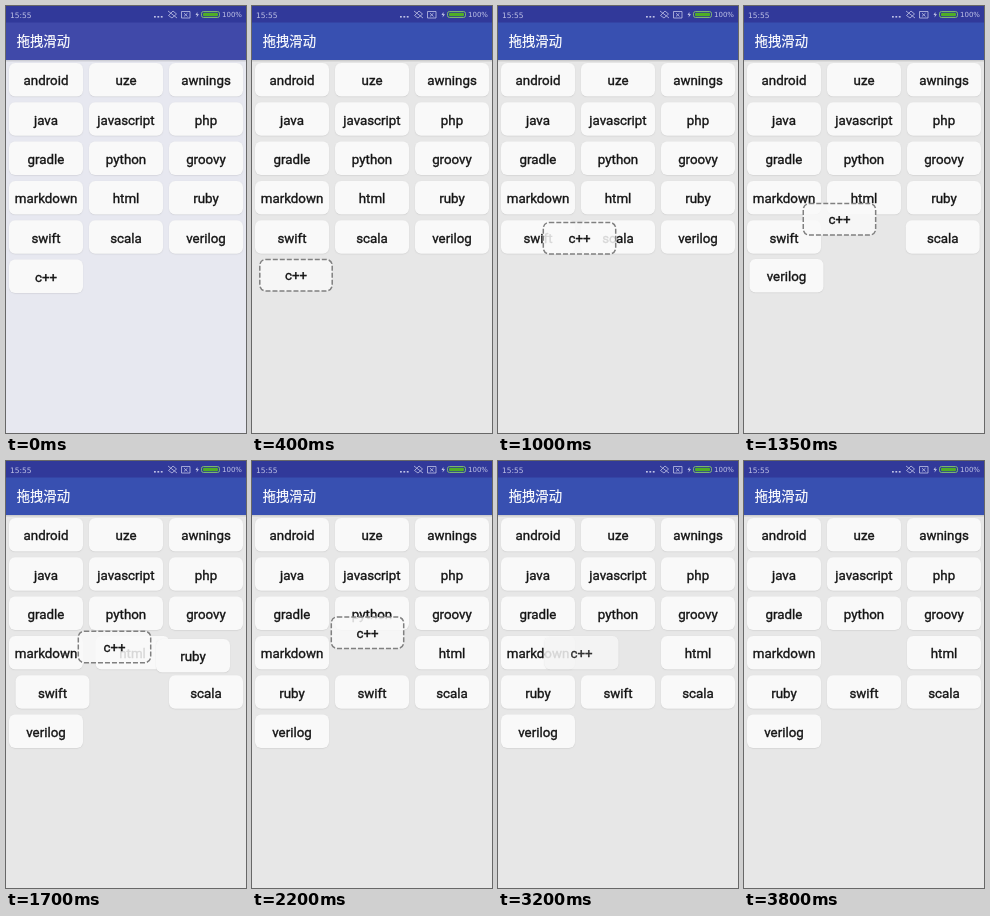
Animation, 240 px wide and 427 px high, one loop 4150 ms. Source, as an HTML page with a canvas:

```html
<!DOCTYPE html>
<html lang="zh-CN">
<head>
<meta charset="utf-8">
<title>拖拽滑动</title>
<style>
  html, body { margin: 0; height: 100%; overflow: hidden; background: #e7e7e7; }
  canvas { display: block; width: 240px; height: 427px; }
</style>
</head>
<body>
<canvas id="stage" width="240" height="427"></canvas>
<script>
const ctx = document.getElementById('stage').getContext('2d');
const LOOP = 4150, STEP = 50, LAST = 3800;
const CARD = { w: 74, h: 33.5, r: 6 };
const UI_FONT = 'Roboto, "Noto Sans CJK SC", "Noto Sans CJK", sans-serif';
const STATUS_FONT = '"DejaVu Sans", sans-serif';
const LABELS = ['android', 'uze', 'awnings', 'java', 'javascript', 'php',
  'gradle', 'python', 'groovy', 'markdown', 'html', 'ruby',
  'swift', 'scala', 'verilog'];

// Dragged card: time, x, y
const DRAG = [
  [150, 3, 253.5], [400, 7, 252.5], [550, 15, 242], [1000, 44.5, 215.5],
  [1120, 50, 214], [1650, 69.5, 174], [1700, 71.5, 169.3], [2200, 78.5, 155]
];
// Swiped card: time, x
const SWIPE = [[2850, 83], [3200, 46.5], [3300, 43], [3500, 24], [3650, -20], [3800, -90]];
const PICK_UP = 200, RELEASE = 2550, SETTLED = 2800;

const lerp = (a, b, p) => a + (b - a) * p;
const progress = (t, start, duration) => Math.min(1, Math.max(0, (t - start) / duration));
const ease = p => (1 - Math.cos(Math.PI * p)) / 2;
const move = (t, start) => ease(progress(t, start, 250));
const slot = i => [3 + 80 * (i % 3), 57 + 39.3 * Math.floor(i / 3)];
const mix = (a, b, p) => a.map((v, k) => lerp(v, b[k], p));

function along(keys, t) {
  const i = keys.findIndex(key => key[0] > t);
  if (i === 0) return keys[0].slice(1);
  if (i < 0) return keys[keys.length - 1].slice(1);
  const [a, b] = [keys[i - 1], keys[i]];
  return mix(a, b, (t - a[0]) / (b[0] - a[0])).slice(1);
}

function text(str, x, y, { size = 13.33, family = UI_FONT, color, align = 'left', weight = 0 }) {
  ctx.font = `${size}px ${family}`;
  ctx.fillStyle = ctx.strokeStyle = color;
  ctx.textAlign = align;
  ctx.fillText(str, x, y);
  if (weight) {
    ctx.lineWidth = weight;
    ctx.strokeText(str, x, y);
  }
}

function roundRect(x, y, w, h, r) {
  ctx.beginPath();
  ctx.roundRect(x, y, w, h, r);
}

function card(label, [x, y], lifted = false, alpha = 1) {
  ctx.save();
  ctx.globalAlpha = alpha;
  if (lifted) {
    roundRect(x + 0.8, y + 0.9, CARD.w - 1.6, CARD.h - 2, CARD.r);
    ctx.fillStyle = 'rgba(249,249,249,.85)';
    ctx.fill();
    ctx.strokeStyle = '#808080';
    ctx.lineWidth = 1.5;
    ctx.setLineDash([5, 2]);
    ctx.stroke();
    ctx.setLineDash([]);
  } else {
    ctx.shadowColor = 'rgba(0,0,0,.12)';
    ctx.shadowBlur = 1;
    ctx.shadowOffsetY = 0.5;
    roundRect(x, y, CARD.w, CARD.h, CARD.r);
    ctx.fillStyle = '#f9f9f9';
    ctx.fill();
    ctx.shadowColor = 'transparent';
  }
  text(label, x + CARD.w / 2, y + (lifted ? 21.8 : 22.3),
    { color: '#141414', align: 'center', weight: 0.35 });
  ctx.restore();
}

function statusBar() {
  const ink = '#bfc2e6';
  text('15:55', 4, 11.7, { size: 7.5, family: STATUS_FONT, color: ink });
  text('100%', 216, 11.4, { size: 7, family: STATUS_FONT, color: ink });
  ctx.lineWidth = 0.8;
  for (let x = 148; x < 157; x += 3.4) ctx.fillRect(x, 10, 1.8, 1.6);
  // Muted bell, crossed box, charging bolt
  ctx.stroke(new Path2D('M162.5 9.5 167 5 170.5 8 166 12ZM162 5 171 12'));
  ctx.stroke(new Path2D('M175.5 5.5H184V12H175.5ZM178 7.2 181.5 10.4M181.5 7.2 178 10.4'));
  ctx.fill(new Path2D('M191.3 6 189.5 9H191L190.5 11.5 193 8.2H191.5Z'));
  roundRect(195.5, 5.5, 18, 6, 2);
  ctx.strokeStyle = '#8fd468';
  ctx.stroke();
  roundRect(197, 6.8, 15, 3.4, 1);
  ctx.fillStyle = '#4fae25';
  ctx.fill();
}

function header(first) {
  const shade = ctx.createLinearGradient(0, 54, 0, 56.5);
  shade.addColorStop(0, 'rgba(0,0,0,.14)');
  shade.addColorStop(1, 'rgba(0,0,0,0)');
  ctx.fillStyle = shade;
  ctx.fillRect(0, 54, 240, 2.5);
  ctx.fillStyle = first ? '#4049a9' : '#3850b1';
  ctx.fillRect(0, 0, 240, 54);
  ctx.fillStyle = '#31399a';
  ctx.fillRect(0, 0, 240, 16.5);
  statusBar();
  text('拖拽滑动', 10.7, 40.2, { color: '#fff', weight: 0.2 });
}

function movingCard(t) {
  if (t >= LAST) return;
  if (t >= SETTLED) {
    const [x] = along(SWIPE, t);
    card('c++', [x, slot(10)[1]], false, 1 - (83 - x) / 240);
  } else {
    const at = mix(along(DRAG, t), slot(10), move(t, RELEASE));
    card('c++', at, t >= PICK_UP);
  }
}

function draw(t) {
  const first = t < STEP;
  ctx.fillStyle = first ? '#e7e8f0' : '#e7e7e7';
  ctx.fillRect(0, 0, 240, 427);
  header(first);
  LABELS.forEach((label, i) => {
    const shift = i >= 13 ? move(t, 1120) : i >= 10 ? move(t, 1654) : 0;
    card(label, mix(slot(i), slot(i + 1), shift));
  });
  movingCard(t);
}

function tick() {
  const t = performance.now() % LOOP;
  draw(Math.min(LAST, Math.floor(t / STEP) * STEP));
  requestAnimationFrame(tick);
}
tick();
</script>
</body>
</html>
```
